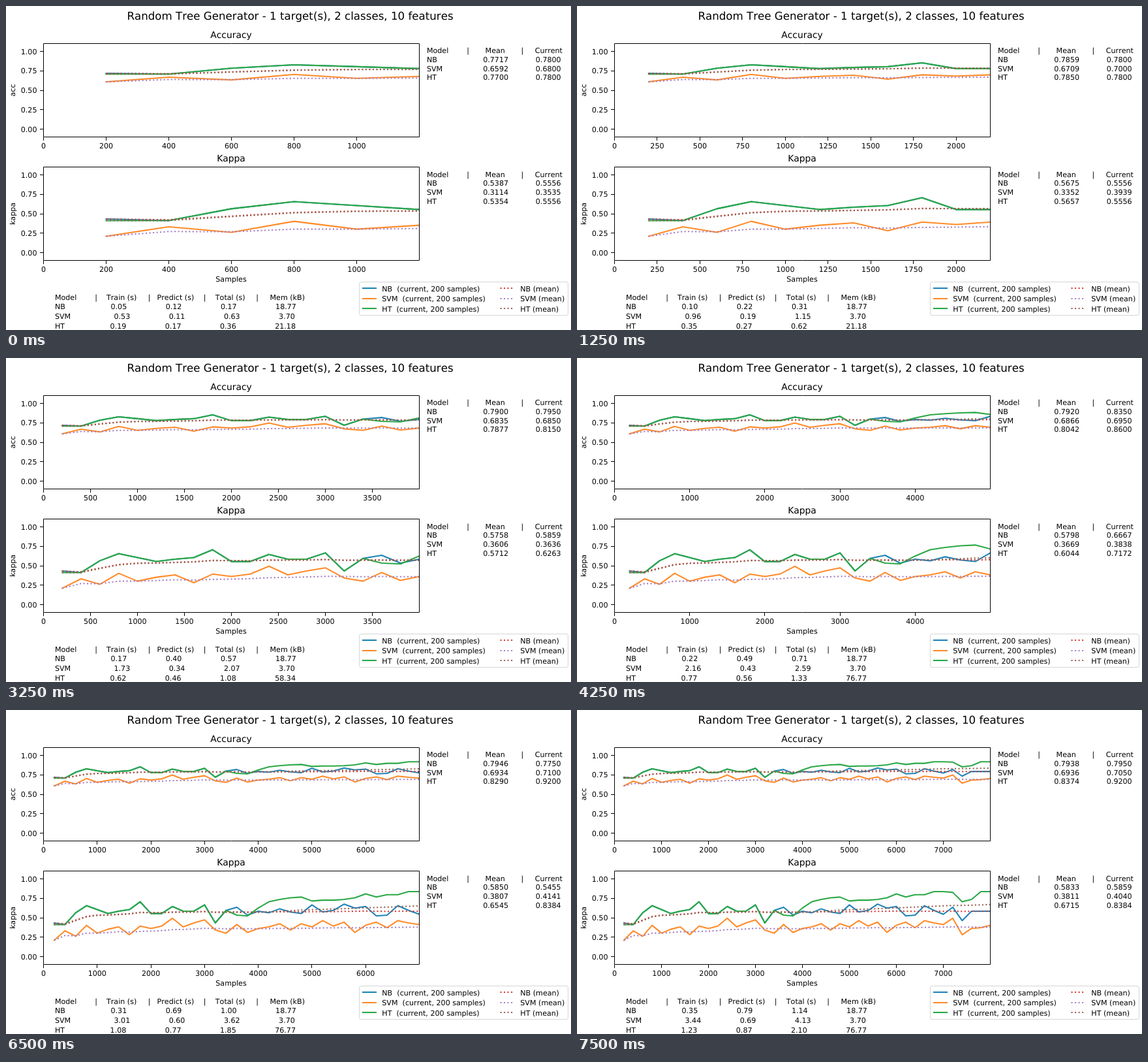
Recreate the animation shown at these times as an HTML page with a canvas. Size 866 by 496 pixels, loop 8 s.

```html
<!DOCTYPE html>
<html lang="en">
<head>
<meta charset="utf-8">
<title>Stream evaluation</title>
<style>
html, body { margin: 0; width: 100%; height: 100%; overflow: hidden; background: #fff; }
canvas { display: block; }
</style>
</head>
<body>
<canvas id="stage" width="866" height="496"></canvas>
<script>
const ctx = document.getElementById('stage').getContext('2d');
const LOOP = 8000;
const SMALL = 11.11;
const WINDOW = 200;
const CHANCE = .505;
const LEFT = 57.5, WIDTH = 576, HEIGHT = 143, UNIT = 119;

// Correct answers in each window of 200 samples; HT leaves NB after its first split.
const hitsNB = [144, 142, 157, 166, 161, 156, 159, 161, 171, 156, 156, 165, 159, 159, 167, 144, 160, 164, 154, 159,
  157, 162, 158, 156, 167, 158, 160, 168, 163, 165, 153, 154, 166, 160, 155, 164, 147, 159, 159, 159];
const hitsSVM = [122, 134, 127, 141, 131, 136, 139, 129, 140, 137, 140, 150, 139, 144, 148, 135, 131, 142, 132, 137,
  139, 143, 135, 143, 139, 147, 140, 145, 132, 141, 145, 138, 147, 144, 142, 150, 129, 137, 138, 141];
const hitsHT = [142, ...hitsNB.slice(1, 17), 154, 153, 163, 171, 174, 176, 177, 172,
  173, 173, 174, 176, 181, 177, 180, 180, 184, 184, 183, 171, 174, 184, 184];

function runningMean(values) {
  let sum = 0;
  return values.map((v, i) => (sum += v) / (i + 1));
}

// Costs grow linearly: base seconds plus seconds per 1000 samples.
const models = [
  { name: 'NB', line: '#1f83b6', dots: '#d13a35', hits: hitsNB, costX: 160.5,
    train: [0, .0437], predict: [0, .0988], memory: () => 18.77 },
  { name: 'SVM', line: '#ff8b2a', dots: '#a47cc4', hits: hitsSVM, costX: 165.5,
    train: [.012, .4288], predict: [.0025, .0856], memory: () => 3.7 },
  { name: 'HT', line: '#2ba846', dots: '#96604f', hits: hitsHT, costX: 159.6,
    train: [.01, .1524], predict: [.042, .104],
    memory: n => n <= 3000 ? 21.18 : n <= 4000 ? 58.34 : 76.77 }
];
for (const m of models) {
  m.current = m.hits.map(h => h / WINDOW);
  m.mean = runningMean(m.current);
}

const panels = [
  { title: 'Accuracy', label: 'acc', top: 57, textY: 72.3, measure: acc => acc },
  { title: 'Kappa', label: 'kappa', top: 246, textY: 261.6, measure: acc => (acc - CHANCE) / (1 - CHANCE) }
];

// Start time and samples seen so far
const states = [[0, 1200], [1250, 2200], [2250, 3000], [3250, 4000],
  [4250, 5000], [5500, 6000], [6500, 7000], [7500, 8000]];

function text(str, x, y, align = 'left', size = SMALL) {
  ctx.font = size + 'px "DejaVu Sans", sans-serif';
  ctx.textAlign = align;
  ctx.fillStyle = '#000';
  ctx.fillText(str, x, Math.round(y));
}

function path(points, color, dotted) {
  ctx.beginPath();
  points.forEach(([x, y]) => ctx.lineTo(x, y));
  ctx.strokeStyle = color;
  ctx.lineWidth = 2.08;
  ctx.lineJoin = 'round';
  ctx.lineCap = dotted ? 'butt' : 'square';
  ctx.setLineDash(dotted ? [2.08, 3.44] : []);
  ctx.stroke();
  ctx.setLineDash([]);
}

function drawPanel(p, n) {
  const bottom = p.top + HEIGHT;
  const px = v => LEFT + WIDTH * v / n;
  const py = v => p.top + 12.7 + (1 - v) * UNIT;
  const plot = (values, color, dotted) => path(
    values.slice(0, n / WINDOW).map((v, i) => [px((i + 1) * WINDOW), py(p.measure(v))]), color, dotted);

  ctx.save();
  ctx.beginPath();
  ctx.rect(LEFT, p.top + .5, WIDTH, HEIGHT);
  ctx.clip();
  models.forEach(m => plot(m.current, m.line, false));
  models.forEach(m => plot(m.mean, m.dots, true));
  ctx.restore();

  ctx.strokeStyle = '#000';
  ctx.lineWidth = 1;
  ctx.strokeRect(LEFT, p.top + .5, WIDTH, HEIGHT);

  const step = [200, 250, 500, 1000].find(s => n / s < 10);
  for (let v = 0; v < n; v += step) {
    ctx.fillRect(Math.floor(px(v)), bottom + 1, 1, 5);
    text(v, px(v), bottom + 18, 'center');
  }
  for (let v = 0; v <= 1; v += .25) {
    ctx.fillRect(52, Math.floor(py(v)), 5, 1);
    text(v.toFixed(2), 47.5, py(v) + 3.8, 'right');
  }

  text(p.title, 345, p.top - 8, 'center', 13.89);
  ctx.save();
  ctx.translate(14, p.top + 72);
  ctx.rotate(-Math.PI / 2);
  text(p.label, 0, 0, 'center');
  ctx.restore();
}

function drawScores(p, n) {
  const last = n / WINDOW - 1;
  const show = acc => p.measure(acc).toFixed(4);
  text('Model', 644.9, p.textY);
  text('|', 708.2, p.textY, 'center');
  text('Mean', 734.6, p.textY);
  text('|', 791.4, p.textY, 'center');
  text('Current', 810.8, p.textY);
  models.forEach((m, i) => {
    const y = p.textY + 13.7 * (i + 1);
    text(m.name, 644.9, y);
    text(show(m.mean[last]), 731.2, y);
    text(show(m.current[last]), 811.8, y);
  });
}

function drawCosts(n) {
  const top = 449.6;
  const seconds = ([base, rate]) => base + rate * n / 1000;
  const heads = [['Model', 74.9], ['Train (s)', 154], ['Predict (s)', 231.6], ['Total (s)', 320.8], ['Mem (kB)', 404.5]];
  heads.forEach(([str, x]) => text(str, x, top));
  [138.2, 219.6, 304.6, 385.2].forEach(x => text('|', x, top, 'center'));
  models.forEach((m, i) => {
    const y = top + 14.8 * (i + 1);
    const train = seconds(m.train), predict = seconds(m.predict);
    text(m.name, 74.9, y);
    [train, predict, train + predict, m.memory(n)].forEach((v, k) =>
      text(v.toFixed(2), m.costX + 84.2 * k, y));
  });
}

function drawLegend() {
  ctx.beginPath();
  ctx.roundRect(541.5, 422.5, 320, 51, 2.5);
  ctx.fillStyle = '#fff';
  ctx.fill();
  ctx.strokeStyle = '#d6d6d6';
  ctx.lineWidth = 1;
  ctx.stroke();
  models.forEach((m, i) => {
    const y = 432.2 + 15.5 * i;
    const mid = Math.round(y);
    path([[547, mid], [567, mid]], m.line, false);
    path([[757.5, mid], [778.5, mid]], m.dots, true);
    text(m.name + '  (current, 200 samples)', 576.3, y + 4.5);
    text(m.name + ' (mean)', 788.3, y + 4.5);
  });
}

function draw(time) {
  const [, n] = states.filter(([at]) => at <= time).pop();
  ctx.textRendering = 'geometricPrecision';
  ctx.fontKerning = 'none';
  ctx.fillStyle = '#fff';
  ctx.fillRect(0, 0, 866, 496);
  ctx.fillStyle = '#000';
  text('Random Tree Generator - 1 target(s), 2 classes, 10 features', 435.5, 21, 'center', 16.67);
  for (const p of panels) {
    drawPanel(p, n);
    drawScores(p, n);
  }
  text('Samples', 345, 422, 'center');
  drawCosts(n);
  drawLegend();
}

const start = performance.now();
function frame() {
  draw((performance.now() - start) % LOOP);
  requestAnimationFrame(frame);
}
frame();
</script>
</body>
</html>
```
